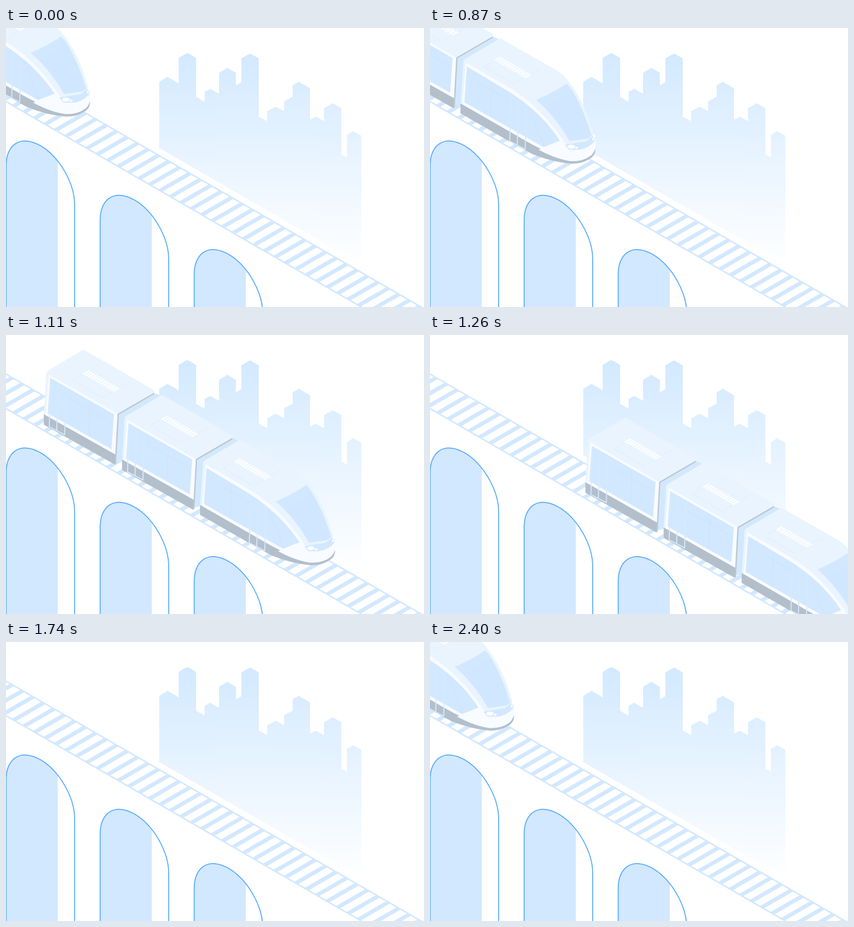
An HTML page that plays this animation: 840 px wide and 560 px high, repeating every 3600 ms.

```html
<!DOCTYPE html>
<html lang="en">
<head>
<meta charset="utf-8">
<title>Train over the viaduct</title>
<style>
  @property --tick { syntax: "<number>"; inherits: false; initial-value: 0; }

  html, body { margin: 0; width: 100%; height: 100%; overflow: hidden; background: #fff; }
  svg { display: block; width: 100vw; height: 100vh; }

  /* One tick is 30 ms: leave during 20-60, come back in during 60-80. */
  .train {
    --leave: clamp(0, (var(--tick) - 20) / 40, 1);
    --enter: clamp(0, (var(--tick) - 60) / 20, 1);
    --wrap: clamp(0, var(--tick) - 59, 1);
    --out: calc(var(--leave) * var(--leave) * (3 - 2 * var(--leave)));
    --in: calc(var(--enter) * var(--enter) * (3 - 2 * var(--enter)));
    --x: calc(1268 * (var(--out) + var(--in) - 2 * var(--wrap)));
    transform: translate(calc(var(--x) * 1px), calc(var(--x) * .5774px));
    animation: clock 3.6s steps(120) -4ms infinite;
  }
  @keyframes clock { from { --tick: 0; } to { --tick: 120; } }

  .line { fill: none; stroke: #d2e8ff; }
  .glass { fill: #d2e8ff; }
  .shell { fill: #e9f4ff; }
  .frame { fill: #f8fbff; }
  .skirt { fill: #b3c0cb; }
  .seam { fill: none; stroke: #c9e2fc; }
  .groove { fill: none; stroke: #dcedfe; }
  .door { fill: none; stroke: #d6eaff; stroke-width: 2; }
  .arch { fill: none; stroke: #5cadff; stroke-width: 2; vector-effect: non-scaling-stroke; }
</style>
</head>
<body>
<svg viewBox="0 0 840 560" preserveAspectRatio="none">
  <defs>
    <linearGradient id="haze" gradientUnits="userSpaceOnUse" x1="0" y1="50" x2="0" y2="475">
      <stop offset="0" stop-color="#d2e9ff"/>
      <stop offset="1" stop-color="#fff"/>
    </linearGradient>
    <clipPath id="inner"><rect x="-82" y="-90" width="122.3" height="600"/></clipPath>

    <g id="arch" transform="matrix(.866 .5 0 1 69.1 315.7)">
      <path class="glass" clip-path="url(#inner)" d="M-79.5 420V0A79.5 79.5 0 0 1 79.5 0V420"/>
      <path class="arch" d="M-79.5 420V0A79.5 79.5 0 0 1 79.5 0V420"/>
    </g>

    <g id="vent">
      <path class="groove" d="M154 79L133 91L195 127M199 123L247 95"/>
      <path d="M0 7H72" transform="matrix(.866 .5 .866 -.5 154 78)"
            fill="none" stroke="#fff" stroke-width="14" stroke-dasharray="3.6 2.1"/>
    </g>

    <g id="car">
      <path class="glass" d="M222 160L300 117L313 123L246 165L236 252L220 256Z"/>
      <path class="shell" d="M81 77Q81 74 84 72L153 31Q156 29 159 31L296 110Q300 113 297 116L225 158L220 241L76 161Z"/>
      <path class="frame" d="M86 79L225 159L220 241L79 162Z"/>
      <path class="skirt" d="M76 159L220 240L219 260L76 180Z"/>
      <path d="M298 117L225.5 159L220 259" fill="none" stroke="#bcc5cc" stroke-width="2.5" stroke-linejoin="round"/>
      <path class="glass" d="M89 86L217 159L212 229L84 157Z"/>
      <path class="seam" d="M169 133L167 203M124 126L214 177"/>
      <path class="door" d="M90 91L87 184L118 200L121 108M105 99L102 192"/>
      <use href="#vent"/>
    </g>

    <g id="nose">
      <path class="shell" d="M396 257Q396 254 399 252L467 212Q470 210 473 212L582 274Q596 282 605 294Q634 330 650 379L660 410Q664 432 656 442L610 455L560 440L390 345Z"/>
      <path class="frame" d="M401 259L492 312C535 338 570 375 602 423L608 434H632Q652 428 661 417Q664 436 654 446Q638 460 612 459Q580 457 530 428L394 344Z"/>
      <path class="skirt" d="M390 341L500 404Q550 434 585 447Q612 458 632 455Q655 449 661 431Q663 446 647 454Q632 463 612 462Q575 459 535 443L500 424L390 361Z"/>
      <path class="frame" d="M557 430L592 417L604 426L632 434Q652 428 661 417Q664 436 652 446Q636 458 612 457Q582 453 547 434Z"/>
      <path class="glass" d="M403 267L480 313C530 343 565 378 590 416L557 429L398 339Z"/>
      <path class="seam" d="M453 300L451 368M430 302L490 336M528 350L558 428"/>
      <path class="door" d="M492 326L489 417L520 433L523 345M507 335L504 424"/>
      <path class="glass" d="M542 334Q574 321 604 301Q632 336 654 406L645 412L609 417Q580 366 542 334Z"/>
      <path d="M558 347Q590 335 613 313Q635 347 652 405L644 411L610 415Q588 375 558 347Z" fill="#d0e7ff"/>
      <path class="glass" d="M600 424L643 417L659 404Q662 413 658 419Q646 431 630 434H608Z"/>
      <g fill="#fff">
        <ellipse cx="613" cy="428" rx="7.5" ry="4"/>
        <ellipse cx="623.5" cy="430" rx="2.8" ry="2"/>
        <ellipse cx="658.5" cy="407" rx="2" ry="3.5"/>
        <ellipse cx="657" cy="413" rx="2" ry="2.5"/>
      </g>
      <use href="#vent" x="304" y="176.5"/>
    </g>
  </defs>

  <path fill="url(#haze)" d="M308 108L324.5 98L347 111V60L364.5 50L382 60V138L399 148V128L410.5 122L428 132V90L445 80L462 90V115L473 109V61L490.5 51L508 61V178L525 187V167L542 158L559 167V147L576 138V115L588.5 108L611 121V184L622.5 178L639 187V161L656.5 151L674 161V254L685 260V215L697.5 207L714 216V475L308 241Z"/>

  <use href="#arch"/>
  <use href="#arch" x="189" y="109"/>
  <use href="#arch" x="378" y="218"/>

  <path class="line" d="M-48.5 -34.5H1050" transform="matrix(.866 .5 .866 -.5 8.5 83.4)"
        stroke-width="69" stroke-dasharray="9.24 15.01"/>
  <path class="line" d="M-10 72.6L860 574.9M-10 142L860 644.3" stroke-width="3"/>

  <g class="train">
    <g transform="translate(-492.5 -284.3)">
      <use href="#car"/>
      <use href="#car" x="157.3" y="90.8"/>
      <use href="#nose"/>
    </g>
  </g>
</svg>
</body>
</html>
```
